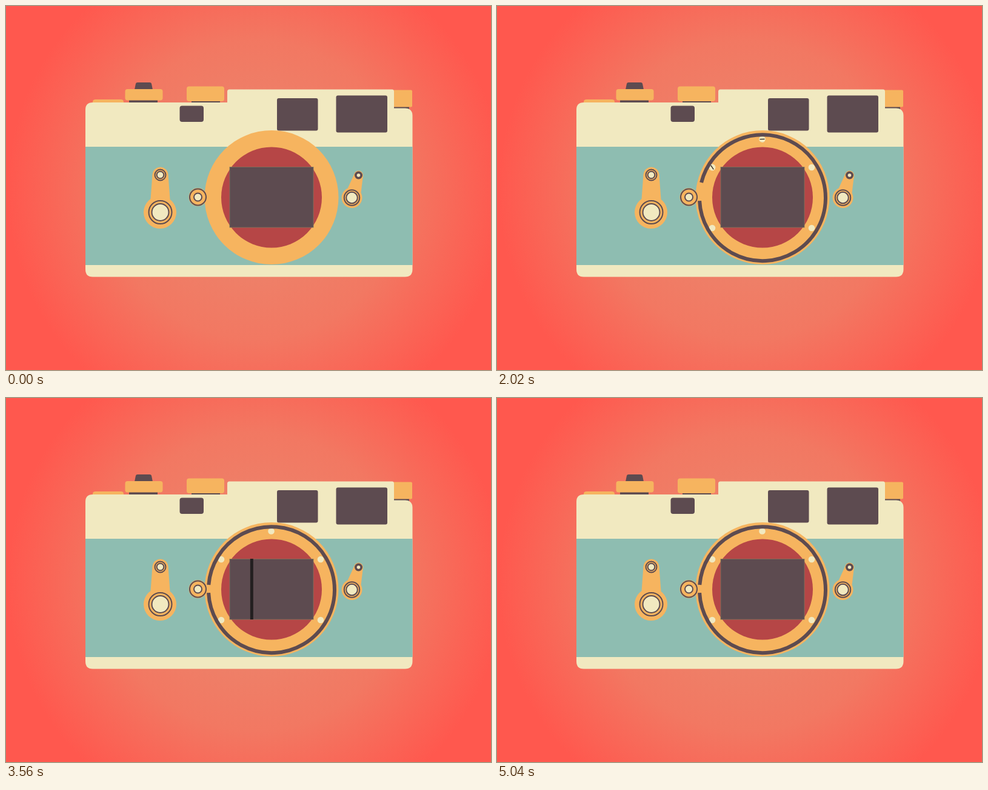
Write an HTML page that moves like this. It is 800 px wide and 600 px high and loops after 5440 ms.

```html
<!DOCTYPE html>
<html lang="en">
<head>
<meta charset="utf-8">
<title>Camera</title>
<style>
  html, body { margin: 0; width: 100%; height: 100%; overflow: hidden; background: #ff584e; }
  svg { display: block; width: 100vw; height: 100vh; }
  .cream { fill: #f1e9c0; }
  .teal { fill: #8ebdb1; }
  .gold { fill: #f6b45f; }
  .plum { fill: #5d4b50; }
  .red { fill: #b64646; }
  .line { stroke: #5d4b50; stroke-width: 2; }
  .none { fill: none; }
  #button { animation: press 5440ms linear infinite; }
  @keyframes press {
    0%, 81.4% { transform: translateY(0); }
    83.6% { transform: translateY(7px); }
    87% { transform: translateY(7px); }
    91.9%, 100% { transform: translateY(0); }
  }
</style>
</head>
<body>
<svg viewBox="0 0 800 600">
  <defs>
    <radialGradient id="glow" gradientUnits="userSpaceOnUse" cx="412" cy="303" r="410">
      <stop offset="0" stop-color="#e98a70"/>
      <stop offset=".6" stop-color="#f27862"/>
      <stop offset="1" stop-color="#ff584e"/>
    </radialGradient>
    <clipPath id="gate"><rect x="369" y="265" width="138" height="100"/></clipPath>
  </defs>
  <rect width="800" height="600" fill="url(#glow)"/>

  <!-- top controls -->
  <path class="gold" d="M143 160V158Q143 154 148 154H189Q194 154 194 158V160Z"/>
  <path id="button" class="plum" d="M212 138L214 128Q214.500 126 217 126H237Q239.500 126 240 128L242 138Z"/>
  <rect class="plum" x="203" y="154" width="47" height="6"/>
  <rect class="gold" x="196.500" y="137" width="62" height="18.500" rx="4"/>
  <rect class="plum" x="306" y="155" width="47" height="5"/>
  <rect class="gold" x="298" y="132.500" width="62" height="24.500" rx="4"/>
  <rect class="plum" x="636" y="164" width="29" height="6"/>
  <rect class="gold" x="632" y="138.500" width="38" height="28" rx="2"/>

  <!-- body -->
  <path class="cream" d="M131 171Q131 159 143 159H365V141Q365 137.500 368.500 137.500H637Q640 137.500 640 141V168.500H658Q670.500 168.500 670.500 181V434Q670.500 446.500 658 446.500H143Q131 446.500 131 434Z"/>
  <rect class="teal" x="131" y="232" width="539.500" height="195"/>
  <rect class="plum" x="286.500" y="164.500" width="39.500" height="26.500" rx="4"/>
  <rect class="plum" x="447" y="152" width="67.500" height="53.500" rx="3"/>
  <rect class="plum" x="544.500" y="147.500" width="84.500" height="61" rx="3"/>

  <!-- left lever -->
  <g class="gold">
    <circle cx="254.500" cy="278.500" r="13"/>
    <circle cx="254" cy="340" r="27"/>
    <path d="M241.500 278L238 325H271L267.500 278Z"/>
  </g>
  <circle class="none line" cx="254.500" cy="278.500" r="9"/>
  <circle class="cream line" cx="254.500" cy="278.500" r="5.800"/>
  <circle class="none line" cx="254.500" cy="340" r="19"/>
  <circle class="cream line" cx="254.500" cy="340" r="14"/>

  <!-- right lever -->
  <g class="gold">
    <circle cx="581.500" cy="279" r="7.500"/>
    <circle cx="570.500" cy="316" r="17"/>
    <path d="M574.200 277.500L562 304L585 312L588.800 281Z"/>
  </g>
  <circle class="plum" cx="581.500" cy="279" r="6.500"/>
  <circle class="cream" cx="581.500" cy="279" r="2.800"/>
  <circle class="none line" cx="570.500" cy="316" r="12.700"/>
  <circle class="cream line" cx="570.500" cy="316" r="9.300"/>

  <!-- mount -->
  <circle class="gold" cx="438" cy="315.500" r="110.500"/>
  <circle class="gold" cx="316.500" cy="315" r="15"/>
  <circle class="none line" cx="316.500" cy="315" r="13.500"/>
  <circle class="cream line" cx="316.500" cy="315" r="6.500"/>
  <circle class="red" cx="438" cy="315.500" r="83"/>
  <rect class="plum" x="369" y="265.500" width="138" height="99.500" stroke="#7d735c" stroke-width=".8"/>
  <g clip-path="url(#gate)"><rect id="bar" y="265" width="5" height="100" fill="#231f20"/></g>
  <g id="screws"></g>
  <path id="ring" class="none" d="M334.100 321.200A104 104 0 1 0 334.300 308" stroke="#5d4b50" stroke-width="6" pathLength="1"/>
</svg>
<script>
  const LOOP = 5440;
  const byId = id => document.getElementById(id);
  const ring = byId('ring'), bar = byId('bar');
  const progress = (t, from, to) => Math.min(1, Math.max(0, (t - from) / (to - from)));
  const easeOut = (p, power) => 1 - (1 - p) ** power;

  // x, y and the moment each screw drops in
  const screws = [
    [355, 366, 190], [519, 366, 455], [519, 266, 720], [437.5, 219.5, 1110], [355, 266, 1580]
  ].map(([x, y, start]) => {
    const node = document.createElementNS('http://www.w3.org/2000/svg', 'g');
    node.innerHTML = '<circle class="cream" r="1"/><path d="M-.75 0H.75" stroke="#1f1b1d" stroke-width=".22"/>';
    byId('screws').append(node);
    return { x, y, start, node, slot: node.lastChild };
  });

  function drawScrew({ x, y, start, node, slot }, t) {
    const age = t - start;
    node.style.display = age < 0 ? 'none' : '';
    if (age < 0) return;
    const radius = 5.3 + 9.5 * Math.exp(-age / 110);
    const angle = 180 - 415 * (1 - progress(age, 0, 970)) ** 2;
    node.setAttribute('transform', `translate(${x} ${y}) rotate(${angle}) scale(${radius})`);
    slot.style.opacity = 1 - progress(age, 900, 1250);
  }

  function barCentre(t) {
    if (t < 4400) return 510 - 144 * easeOut(progress(t, 2682, 4200), 1.5);
    return 366 + 144 * progress(t, 4560, 5030);
  }

  function draw(t) {
    ring.style.strokeDasharray = `${easeOut(progress(t, 0, 3040), 3.3)} 2`;
    ring.style.display = t < 20 ? 'none' : '';
    screws.forEach(screw => drawScrew(screw, t));
    bar.setAttribute('x', barCentre(t) - 2.5);
  }

  function tick() {
    const css = byId('button').getAnimations()[0];
    const now = performance.now();
    if (css) css.currentTime = now % LOOP;
    draw(now % LOOP);
    requestAnimationFrame(tick);
  }
  tick();
</script>
</body>
</html>
```
